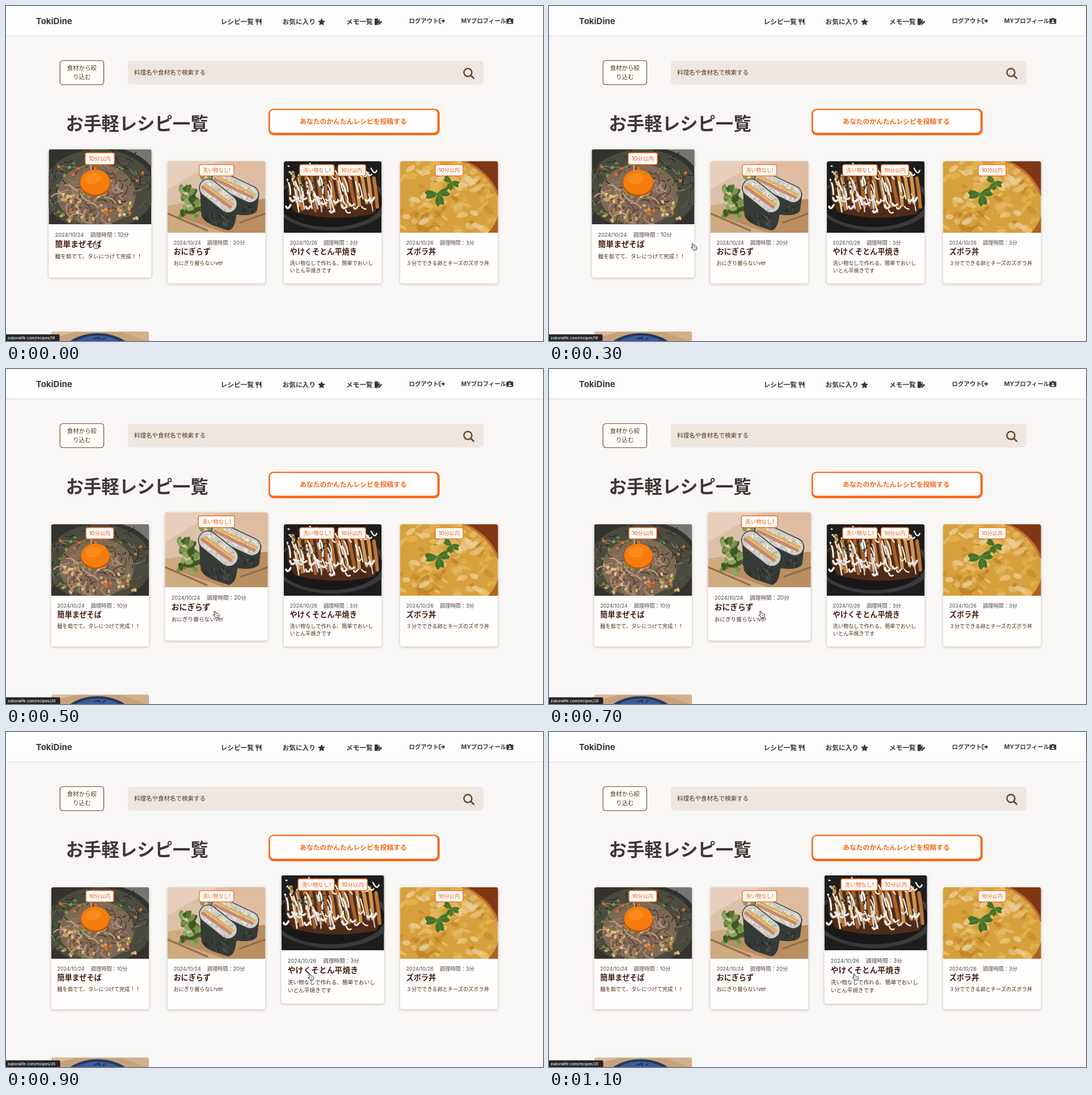
An HTML page that plays this animation: 947 px wide and 591 px high, repeating every 1.2 s.

```html
<!DOCTYPE html>
<html lang="ja">
<head>
<meta charset="utf-8">
<title>お手軽レシピ一覧</title>
<style>
  html, body { margin: 0; width: 100%; height: 100%; overflow: hidden; background: #f9f7f5; }
  svg { display: block; width: 947px; height: 591px; font-family: Inter, "Noto Sans CJK JP", "Noto Sans CJK", sans-serif; }
  .card { filter: drop-shadow(0 1px 2px rgba(60, 50, 45, .34)); }
</style>
</head>
<body>
<svg id="stage" viewBox="0 0 947 591"></svg>
<script>
const INK = '#3b3736', BROWN = '#563414', ORANGE = '#f7681a';
const W = 172.5, H = 215.5, PHOTO_H = 126;

// ---- helpers ----
let seed = 1;
const rnd = (a, b) => {
  seed = (seed * 16807) % 2147483647;
  return +(a + (b - a) * seed / 2147483647).toFixed(2);
};
const pick = list => list[Math.floor(rnd(0, list.length - .01))];
const many = (n, make) => Array.from({ length: n }, (_, i) => make(i)).join('');
const rect = (x, y, w, h, fill, r = 0, more = '') =>
  `<rect x="${x}" y="${y}" width="${w}" height="${h}" rx="${r}" fill="${fill}" ${more}/>`;
const oval = (x, y, rx, ry, fill, turn = 0, more = '') =>
  `<ellipse rx="${rx}" ry="${ry}" fill="${fill}" transform="translate(${x} ${y}) rotate(${turn})" ${more}/>`;
const shape = (d, fill, more = '') => `<path d="${d}" fill="${fill}" ${more}/>`;
const line = (d, color, w, more = '') =>
  `<path d="${d}" fill="none" stroke="${color}" stroke-width="${w}" stroke-linecap="round" stroke-linejoin="round" ${more}/>`;
const text = (x, y, size, str, fill, weight = 400, more = '') =>
  `<text x="${x}" y="${y}" font-size="${size}" fill="${fill}" font-weight="${weight}" ${more}>${str}</text>`;
const MID = 'text-anchor="middle"';

// ---- dishes, each in a 172.5 x 126 box ----
function noodles() {
  seed = 11;
  const strand = (cx, cy, rx, ry, colors, len, w) => {
    const a = rnd(0, 6.28), r = Math.sqrt(rnd(.1, 1));
    const x = cx + rx * r * Math.cos(a), y = cy + ry * r * Math.sin(a);
    const t = rnd(0, 6.28), dx = len * Math.cos(t), dy = len * Math.sin(t);
    return line(`M${x} ${y}q${dx * .6 - dy * .3} ${dy * .6 + dx * .3} ${dx} ${dy}`, pick(colors), w);
  };
  return rect(0, 0, W, PHOTO_H, '#34322f') +
    oval(84, 68, 94, 68, '#4b4a3f') +
    shape('M125 0H173V30Q155 8 125 0', '#777574') +
    oval(80, 76, 66, 52, '#7d6755') +
    many(110, () => strand(84, 64, 92, 62, ['#25271f', '#5d6344', '#84855f', '#3b3b2d'], 14, 1.4)) +
    many(85, () => strand(78, 82, 56, 42, ['#a9856f', '#8c6c59', '#c09c87', '#61493b'], 20, 2.4)) +
    many(45, () => oval(rnd(8, 150), rnd(70, 123), 3.4, 2.3, pick(['#cda567', '#dfbf84', '#a27e4c']), rnd(0, 180))) +
    many(32, () => oval(rnd(15, 158), rnd(16, 118), 3, 2.3, pick(['#e06e22', '#869a46', '#6d8638']), rnd(0, 180))) +
    oval(78, 57, 26, 22, '#b85710') + oval(78, 55, 25, 21, '#f67d0c') +
    oval(74, 49, 14, 9, '#fb8c1c', -12);
}

function riceSandwich() {
  seed = 23;
  const half = (nori, x1, y1, x2, y2, w) => {
    const bar = (o, color, width) => line(`M${x1 + o - 7} ${y1 - o - 4}L${x2 + o + 6} ${y2 - o + 3}`, color, width);
    return shape(nori, '#363a36') +
      line(`M${x1} ${y1}L${x2} ${y2}`, '#3d4039', w + 3) +
      line(`M${x1} ${y1}L${x2} ${y2}`, '#cfcdc8', w) +
      many(70, () => {
        const t = rnd(-.1, 1.1), o = rnd(-.42, .42) * w;
        return oval(x1 + (x2 - x1) * t + o * .6, y1 + (y2 - y1) * t - o * .8, 2, 1.1, pick(['#eeece8', '#aeaea9', '#f4f3f0']), rnd(0, 180));
      }) +
      bar(-2.5, '#c98a6a', w * .2) + bar(2, '#e6b040', w * .12);
  };
  return rect(0, 0, W, PHOTO_H, '#dcc1aa') +
    shape('M0 0H90L40 26L0 50Z', '#e8cfbd') +
    shape('M105 0H173V60L140 35Z', '#dfbca0') +
    shape('M0 88L80 76L173 66V126H0Z', '#b98e61') +
    shape('M0 78L26 74V100L100 126H0Z', '#d0aa80') +
    line('M0 92L70 122M128 108L173 92', '#946b45', 3) +
    many(36, () => oval(rnd(24, 60), rnd(46, 102), 7, 4, pick(['#577332', '#78924a', '#3f5926', '#90a660']), rnd(0, 180))) +
    many(8, () => oval(rnd(58, 84), rnd(18, 30), 6, 4, pick(['#6f8744', '#88995a']), rnd(0, 180))) +
    half('M88 45L122 94Q151 98 158 87L162 56Z', 93, 33, 146, 58, 28) +
    half('M57 47L60 96Q64 107 83 114L107 122Q117 120 120 104L125 76Z', 72, 47, 107, 75, 30) +
    many(26, () => line(`M${rnd(64, 114)} ${rnd(88, 110)}l2 5`, pick(['#505650', '#242825']), 1.6)) +
    many(10, () => line(`M${rnd(132, 154)} ${rnd(76, 89)}l-1 4`, pick(['#505650', '#242825']), 1.6));
}

function pancake() {
  seed = 37;
  return rect(0, 0, W, PHOTO_H, '#1e1d1d') +
    oval(84, 72, 100, 50, '#3b3a39') + oval(82, 71, 92, 45, '#191819') +
    shape('M8 38Q35 8 110 12L160 32Q175 62 160 92Q90 108 20 90Q2 68 8 38Z', '#4f2b18') +
    many(14, i => line(`M${16 + i * 11} ${rnd(20, 32)}q4 25 ${rnd(5, 11)} ${rnd(48, 58)}`, pick(['#b97635', '#a6602a', '#cf9852']), 6)) +
    many(38, () => line(`M${rnd(6, 152)} ${rnd(24, 62)}q${rnd(0, 8)} ${rnd(8, 14)} ${rnd(3, 8)} ${rnd(18, 30)}`, pick(['#f6f4f1', '#e4e0dc', '#d2cdc8']), rnd(1.5, 3.4))) +
    many(22, i => line(`M${4 + i * 7} ${rnd(58, 90)}q3 ${rnd(4, 9)} 8 ${rnd(-4, 5)}`, '#efecE8', rnd(2, 4))) +
    many(9, i => line(`M${82 + i * 9} ${rnd(10, 20)}q6 ${rnd(10, 16)} 10 ${rnd(0, 22)}`, '#f4f2ef', 2.4)) +
    many(48, () => oval(rnd(8, 76), rnd(9, 52), 2.4, 1.4, pick(['#344020', '#1d2717', '#485331']), rnd(0, 180))) +
    many(14, () => oval(rnd(4, 60), rnd(4, 26), 2.2, 1.4, '#dad8d2', rnd(0, 180)));
}

function eggBowl() {
  seed = 51;
  const leaf = (x, y, s, turn) => `<g transform="translate(${x} ${y}) rotate(${turn}) scale(${s})">` +
    shape('M0 0Q-19-12-24-2L-20 4L-23 8Q-10 13 0 2Q-9 17 1 25L5 20L12 21Q15 8 2 1Q18 10 24 0L18-4L19-10Q9-13 0 0', '#437329') +
    line('M0 1L-17 2M1 2L5 17M2 0L16-4', '#6a9142', 1) + '</g>';
  return rect(0, 0, W, PHOTO_H, '#d6a03c') +
    many(120, () => oval(rnd(0, 165), rnd(0, 126), rnd(4, 12), rnd(2, 6), pick(['#e6b64e', '#c88d2c', '#ecc673', '#ddb053', '#bd7f26', '#e6bd70']), rnd(-60, 40), 'opacity=".75"')) +
    many(16, () => oval(rnd(5, 145), rnd(3, 122), rnd(6, 11), 4.5, '#ebd09a', rnd(-40, 30), 'opacity=".75"')) +
    shape('M108 0H173V62Q162 18 108 0Z', '#813715') +
    line('M113 0Q155 18 172 58', '#c36d34', 4) +
    shape('M155 126Q168 113 173 95V126Z', '#ac6121') +
    line('M65 57Q80 49 90 37', '#6f9140', 2) +
    leaf(66, 57, .93, 0) + leaf(91, 36, .65, 35);
}

function blueBowl() {
  return rect(0, 0, W, PHOTO_H, '#c6a27c') +
    shape('M0 0H46L0 12Z', '#dabb99') + shape('M120 0H173V18Z', '#d2b08b') +
    oval(82, 48, 67, 45, '#263759') + oval(82, 50, 61, 43, '#3b5c9a') +
    line('M76 13l8-2M84 10l2 4M91 14l4-3', '#1f3154', 2);
}

// ---- page parts ----
const badge = (x, str, w) => rect(x, 5.8, w, 19.8, '#fffdfb', 3, `stroke="${ORANGE}" stroke-width="1.3"`) +
  text(x + w / 2, 19, 9.2, str, '#e2631a', 500, MID);
const quick = x => badge(x, '10分以内', 49);
const noWash = x => badge(x, '洗い物なし!', 61);

const cards = [
  { photo: noodles, tags: quick(61.3), day: 24, min: 10, name: '簡単まぜそば', note: ['麺を茹でて、タレにつけて完成！！'] },
  { photo: riceSandwich, tags: noWash(56), day: 24, min: 20, name: 'おにぎらず', note: ['おにぎり握らないver'] },
  { photo: pancake, tags: noWash(28) + quick(95.5), day: 26, min: 3, name: 'やけくそとん平焼き', note: ['洗い物なしで作れる、簡単でおいし', 'いとん平焼きです'] },
  { photo: eggBowl, tags: quick(62), day: 26, min: 3, name: 'ズボラ丼', note: ['３分でできる卵とチーズのズボラ丼'] }
];
const cardX = i => 79.6 + i * 205.15;

const cardBody = c => rect(0, 0, W, H, '#fffefd', 4) +
  `<g clip-path="url(#photo)">${c.photo()}</g>` + c.tags +
  text(10.7, 146.5, 8.8, `2024/10/${c.day}`, '#4c4745') +
  text(70, 146.5, 9.2, `調理時間：${c.min}分`, '#4c4745') +
  text(10.7, 163.6, 13.15, c.name, '#451d0e', 700) +
  c.note.map((s, i) => text(10.7, 183.3 + i * 13, 9.2, s, '#4b2b12')).join('');

const icons =
  line('M441 23v3q0 2 2 2t2-2v-3M443 23v10', INK, 1.4) +
  shape('M450.5 22v11h-1.7v-4h-2v-3q1-3.5 3.7-4', INK) +
  shape('M556.5 21.5l2 4.2 4.6.6-3.4 3.2.9 4.6-4.1-2.2-4.1 2.2.9-4.6-3.4-3.2 4.6-.6z', INK) +
  shape('M651 22h5v3.5h3.5v2l-4 4v2H651q-1 0-1-1v-9.5q0-1 1-1M657 22l2.5 2.7H657z', INK) +
  line('M657.5 32.2l4.3-4.3', INK, 2.6) +
  line('M767 22.3h-2q-1 0-1 1v6q0 1 1 1h2M767 26.3h4.5', INK, 1.5) +
  shape('M770 22.4l4.3 3.9-4.3 3.9z', INK) +
  rect(882.5, 22.3, 12, 9.3, INK, 1) + rect(887, 21, 3, 2.5, INK) +
  '<circle cx="888.5" cy="25.5" r="1.3" fill="#fff"/>' + shape('M885.5 30q0-2.5 3-2.5t3 2.5z', '#fff');

const header = rect(0, 0, 947, 52.4, '#fefdfd') + rect(0, 52.2, 947, 1, '#dcd8d6') +
  text(52.8, 32, 15, 'TokiDine', INK, 700) +
  text(378.5, 31.8, 11.7, 'レシピ一覧', INK, 700) +
  text(487.5, 31.8, 11.7, 'お気に入り', INK, 700) +
  text(600, 31.8, 11.7, 'メモ一覧', INK, 700) +
  text(710.5, 30.2, 10.5, 'ログアウト', INK, 700) +
  text(802.8, 30.2, 10.4, 'MYプロフィール', INK, 700) + icons;

const tools = rect(95.2, 96.2, 77.2, 42.6, '#fffefd', 5, 'stroke="#68401f" stroke-width="1.1"') +
  text(133.8, 113.4, 10.5, '食材から絞', BROWN, 400, MID) +
  text(133.8, 129, 10.5, 'り込む', BROWN, 400, MID) +
  rect(215, 96.5, 627, 42, '#eee7e1', 5) +
  text(226, 121.2, 10.5, '料理名や食材名で検索する', BROWN) +
  '<circle cx="814.5" cy="117.3" r="7" fill="none" stroke="#6b4729" stroke-width="2.5"/>' +
  line('M819.8 122.6L824.7 127.5', '#6b4729', 2.8) +
  text(105.5, 219, 31.4, 'お手軽レシピ一覧', INK, 700) +
  rect(463, 181.2, 301.8, 46.8, ORANGE, 9) + rect(465.6, 183.6, 295.2, 40, '#fffefd', 6) +
  text(612.5, 208, 11.8, 'あなたのかんたんレシピを投稿する', ORANGE, 700, MID);

const hand = shape('M-3.3-5.5q1.3-1.2 2.2.5l1.3 3.3q1.3-.8 2 .2 1.3-.4 1.8.7 1.2.1 1.4 1.5.4 2.5-.7 4.8H-.8Q-2 3.3-4.5 1.6q-.7-1.4.9-1.2l1.5.8z',
  '#fff', 'stroke="#222" stroke-width="1" stroke-linejoin="round"') +
  line('M.8.9l.7 2.3M2.5.6l.5 2.3', '#333', .6);

const stage = document.getElementById('stage');
stage.innerHTML =
  `<defs><clipPath id="photo"><path d="M0 ${PHOTO_H}V4Q0 0 4 0H${W - 4}Q${W} 0 ${W} 4V${PHOTO_H}Z"/></clipPath></defs>` +
  rect(0, 0, 947, 591, '#f9f7f5') + header + tools +
  cards.map(c => `<g class="card">${cardBody(c)}</g>`).join('') +
  `<g transform="translate(79.6 574.2)" clip-path="url(#photo)">${blueBowl()}</g>` +
  '<path id="bar" fill="#242426"/>' + text(2.8, 587.7, 6.7, '', '#fff', 500, 'id="link"') +
  `<g id="hand">${hand}</g>`;

// ---- motion: the screen refreshes every 100 ms ----
// pointer stops: time, x, y, easing power towards the next stop
const path = [
  [0, 157.5, 422.5, 2],
  [200, 202, 421, 1.6],
  [400, 364, 433, .5],
  [700, 375, 433, 1],
  [800, 536, 432, 1],
  [1100, 540, 432.5, 1]
];
// hovered card: from time, card, recipe id; the lift takes 100 ms to settle
const hovers = [[0, 0, 19], [305, 1, 20], [790, 2, 25]];
const RISE = 100;

const smooth = t => t * t * (3 - 2 * t);
const clamp = t => Math.min(1, Math.max(0, t));

function pointerAt(ms) {
  const i = path.findLastIndex(p => p[0] <= ms);
  const [t0, x0, y0, power] = path[i];
  const [t1, x1, y1] = path[i + 1] || [1200, x0, y0];
  const k = Math.pow((ms - t0) / (t1 - t0), power);
  return [x0 + (x1 - x0) * k, y0 + (y1 - y0) * k];
}

function liftAt(card, ms) {
  const n = hovers.findIndex(h => h[1] === card);
  if (n < 0) return 0;
  const turn = from => smooth(clamp((ms - from) / RISE));
  const up = n === 0 ? 1 : turn(hovers[n][0]);
  const down = hovers[n + 1] ? turn(hovers[n + 1][0]) : 0;
  return up - down;
}

const groups = [...stage.querySelectorAll('.card')];
const pointer = document.getElementById('hand');
const link = document.getElementById('link');
const bar = document.getElementById('bar');

function place(group, i, lift) {
  const s = 1 + .05 * lift, x = cardX(i) + W / 2 * (1 - s);
  const y = 274 + H / 2 * (1 - s) - 15.75 * lift;
  group.setAttribute('transform', `translate(${x} ${y}) scale(${s})`);
}

let shown = -1;
function draw(time) {
  const ms = Math.floor(time % 1200 / 100) * 100;
  if (ms === shown) return;
  shown = ms;
  const id = hovers.findLast(h => h[0] <= ms)[2];
  groups.forEach((g, i) => place(g, i, liftAt(i, ms)));
  pointer.setAttribute('transform', `translate(${pointerAt(ms).join(' ')})`);
  link.textContent = `zuboralife.com/recipes/${id}`;
  bar.setAttribute('d', `M0 579.3H${id === 19 ? 92.5 : 93.5}q2 0 2 2V591H0Z`);
}

const start = performance.now();
function tick() {
  draw(Math.max(0, performance.now() - start));
  requestAnimationFrame(tick);
}
tick();
</script>
</body>
</html>
```
